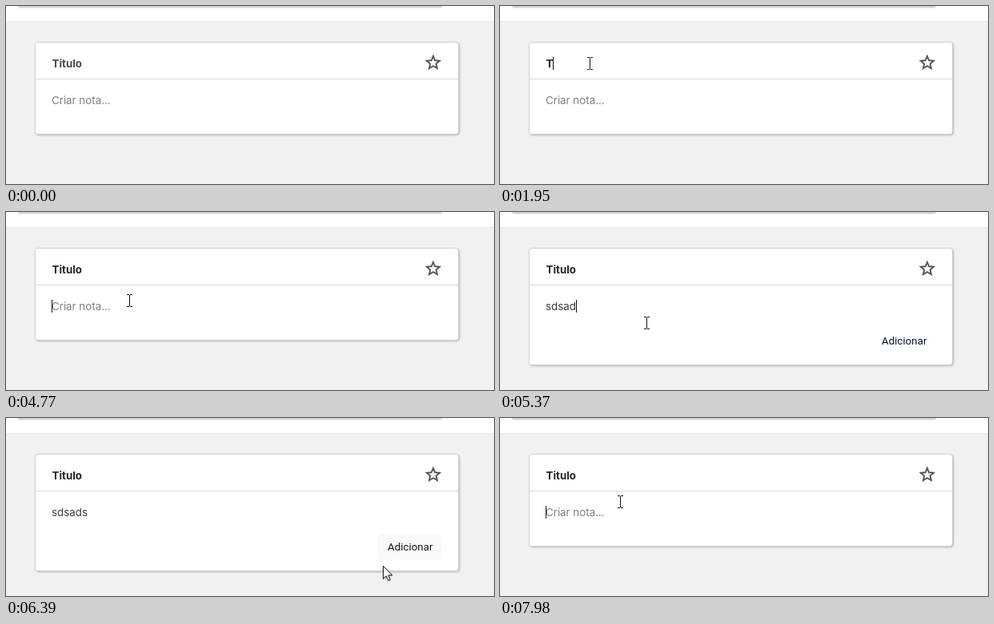
These frames come from a looping animation (610x223 px, 8 s). An HTML page with a canvas:

```html
<!DOCTYPE html>
<html lang="pt">
<head>
<meta charset="utf-8">
<style>
html, body { margin: 0; width: 100%; height: 100%; overflow: hidden; background: #f0f1f3; }
canvas { display: block; }
</style>
</head>
<body>
<canvas id="stage" width="610" height="223"></canvas>
<script>
const ctx = document.getElementById('stage').getContext('2d');
const LOOP = 8000;
const TITLE_FONT = '700 13.333px Inter, sans-serif';
const NOTE_FONT = '400 13.333px Inter, sans-serif';
const BUTTON_FONT = '400 13.333px Roboto, sans-serif';

const TITLE_FOCUS = 1100, STAR_FOCUS = 3900, NOTE_FOCUS = 4410;
const BLINK = 500;
const titleTyping = { word: 'Titulo', start: 1950, pace: 288 };
const noteTyping = { word: 'sdsads', start: 5090, pace: 70 };
const noteErasing = { start: 6856, pace: 126 };

const ENTRY = { start: 230, x: 290, y: 235 };
const glides = [
  { start: 230, end: 390, x: 117, y: 94 },
  { start: 860, end: 900, x: 112, y: 72 },
  { start: 4570, end: 4930, x: 183, y: 139 },
  { start: 5560, end: 5950, x: 505, y: 162 },
  { start: 6200, end: 6390, x: 471, y: 185 },
  { start: 6390, end: 7110, x: 232, y: 186 },
  { start: 7110, end: 7900, x: 150, y: 105 },
];

const star = new Path2D('M22 9.24l-7.19-.62L12 2 9.19 8.63 2 9.24l5.46 4.73L5.82 21 12 17.27 18.18 21l-1.63-7.03L22 9.24z' +
  'M12 15.4l-3.76 2.27 1-4.28-3.32-2.88 4.38-.38L12 6.1l1.71 4.04 4.38.38-3.32 2.88 1 4.28L12 15.4z');
const arrow = new Path2D('M.5 .5V16.5L4.3 13 6.8 18.6 9.2 17.5 6.8 12H11.7Z');
const hand = new Path2D('M-1.5 9V1.5Q0-.5 1.5 1.5V6Q3 5 4.3 6.5 6 5.6 7 7.3 9 6.7 9.7 8.7V13Q9.3 15.5 7.7 19H0' +
  'Q-2 15-5 12-5.5 10-4 9.5Q-2.7 9.5-1.5 11Z');

const clamp = v => Math.max(0, Math.min(1, v));
const smooth = v => v * v * (3 - 2 * v);

// Number of keystrokes made by time t, and the time of the latest one
function strokes(t, { start, pace }, max) {
  const count = Math.max(0, Math.min(max, Math.floor((t - start) / pace) + 1));
  return { count, last: count ? start + (count - 1) * pace : 0 };
}

function field(t, focus, typing, erasing) {
  const max = typing.word.length;
  const typed = strokes(t, typing, max);
  const erased = erasing ? strokes(t, erasing, max) : { count: 0, last: 0 };
  return {
    text: typing.word.slice(0, typed.count - erased.count),
    active: Math.max(focus, typed.last, erased.last),
  };
}

function pointerAt(t) {
  let { x, y } = ENTRY;
  for (const g of glides) {
    const k = smooth(clamp((t - g.start) / (g.end - g.start)));
    x += (g.x - x) * k;
    y += (g.y - y) * k;
  }
  return [Math.round(x), Math.round(y)];
}

function box(x, y, w, h, color) {
  ctx.fillStyle = color;
  ctx.fillRect(x, y, w, h);
}

function text(str, x, y, font, color) {
  ctx.font = font;
  ctx.fillStyle = color;
  ctx.fillText(str, x, y);
}

function shadow(color, blur, offset) {
  ctx.shadowColor = color;
  ctx.shadowBlur = blur;
  ctx.shadowOffsetX = ctx.shadowOffsetY = offset;
}

function rounded(x, y, w, h, r) {
  ctx.beginPath();
  ctx.roundRect(x, y, w, h, r);
}

function caret(t, { text, active }, font, top) {
  if (Math.floor((t - active) / BLINK) % 2) return;
  ctx.font = font;
  box(57 + Math.ceil(ctx.measureText(text).width), top, 1, 16, '#111');
}

function drawBeam(x, y) {
  for (const dy of [-8, 7]) {
    box(x - 3, y + dy, 3, 1, '#111');
    box(x + 1, y + dy, 3, 1, '#111');
  }
  box(x, y - 7, 1, 14, '#111');
}

function drawPointer(x, y, open) {
  if (x > 37 && x < 565 && y > 52 && y < 142) return drawBeam(x, y);
  const overButton = open && x > 465 && x < 545 && y > 146 && y < 178;
  const shape = overButton ? hand : arrow;
  ctx.save();
  ctx.translate(x, y);
  shadow('rgba(0,0,0,.3)', 2, 1);
  ctx.fillStyle = '#fff';
  ctx.fill(shape);
  shadow('transparent', 0, 0);
  ctx.strokeStyle = '#111';
  ctx.lineWidth = 1;
  ctx.stroke(shape);
  ctx.restore();
}

function drawPage() {
  box(0, 0, 610, 223, '#f0f1f3');
  box(0, 0, 610, 19, '#fff');
  box(0, 19, 610, 1, '#e6e7e9');
  ctx.save();
  shadow('rgba(0,0,0,.25)', 2, 0);
  rounded(15, -8, 530, 10, 3);
  ctx.fillStyle = '#d2d2d2';
  ctx.fill();
  ctx.restore();
}

function drawCard(open) {
  const height = open ? 146 : 115;
  ctx.save();
  shadow('rgba(0,0,0,.35)', 3, 1);
  rounded(36.5, 45.5, 529, height, 3);
  ctx.fillStyle = '#fff';
  ctx.fill();
  ctx.restore();
  ctx.strokeStyle = '#d4d5d7';
  ctx.lineWidth = 1;
  ctx.stroke();
  box(37, 91, 528, 1, '#dadada');
}

function drawStar(focused) {
  ctx.save();
  ctx.translate(522, 58.8);
  ctx.fillStyle = ctx.strokeStyle = '#505053';
  ctx.lineWidth = 0.3;
  ctx.fill(star);
  ctx.stroke(star);
  ctx.restore();
  if (!focused) return;
  rounded(521.75, 57.75, 24.5, 24.5, 2);
  ctx.strokeStyle = '#222';
  ctx.lineWidth = 1.5;
  ctx.stroke();
}

function drawButton(t) {
  const hover = clamp((t - 5860) / 200) * clamp((6560 - t) / 170);
  rounded(465, 146, 80, 32, 3);
  ctx.fillStyle = `rgba(0,0,0,${0.022 * hover})`;
  ctx.fill();
  text('Adicionar', 477, 166, BUTTON_FONT, t < 5860 ? '#04142f' : '#14181b');
}

function draw(t) {
  const title = field(t, TITLE_FOCUS, titleTyping);
  const note = field(t, NOTE_FOCUS, noteTyping, noteErasing);
  const open = note.text !== '';

  drawPage();
  drawCard(open);
  drawStar(t >= STAR_FOCUS && t < NOTE_FOCUS);
  text(title.text || 'Titulo', 57.5, 77, TITLE_FONT, title.text ? '#262626' : '#4c4a4a');
  text(note.text || 'Criar nota...', 57, 123, NOTE_FONT, open ? '#3c3c3c' : '#827d79');
  if (open) drawButton(t);
  if (t >= TITLE_FOCUS && t < STAR_FOCUS) caret(t, title, TITLE_FONT, 64);
  if (t >= NOTE_FOCUS) caret(t, note, NOTE_FONT, 110);
  if (t >= ENTRY.start) drawPointer(...pointerAt(t), open);
}

function tick() {
  draw(performance.now() % LOOP);
  requestAnimationFrame(tick);
}
tick();
</script>
</body>
</html>
```
